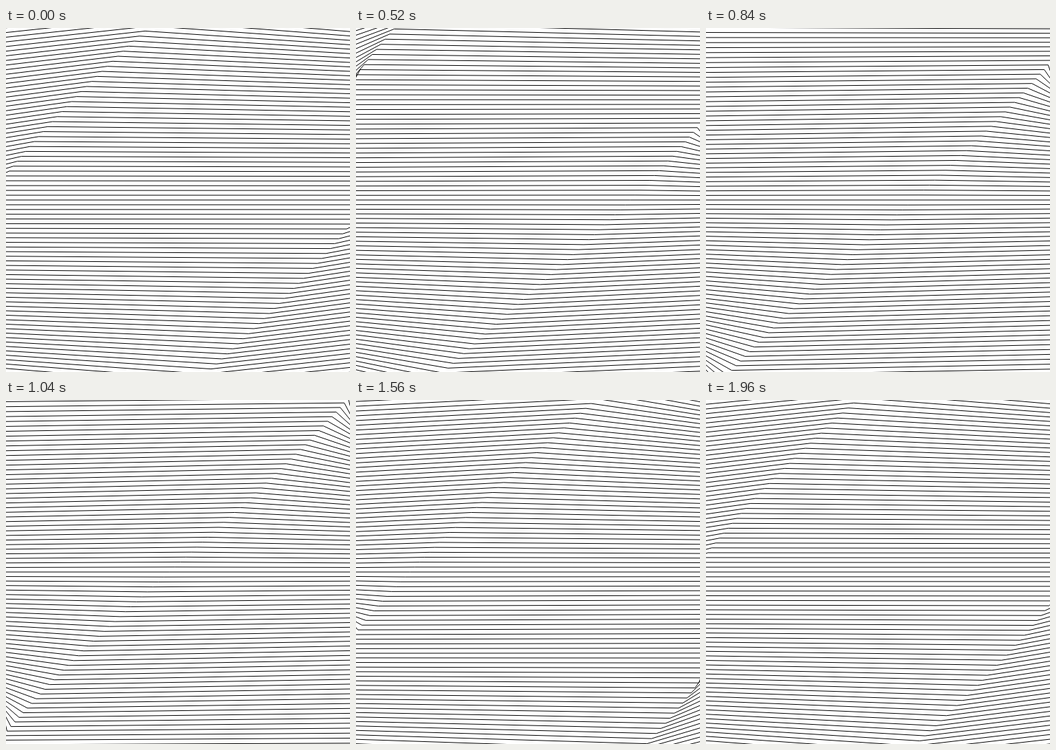
An HTML page with a canvas that plays this animation: 500 by 500 pixels, repeating every 2 s.

```html
<!DOCTYPE html>
<html lang="en">
<head>
<meta charset="utf-8">
<title>Twisted column</title>
<style>
html, body { margin: 0; width: 100%; height: 100%; overflow: hidden; background: #fff; }
canvas { display: block; width: 500px; height: 500px; }
</style>
</head>
<body>
<canvas id="stage" width="500" height="500"></canvas>
<script>
// A twisted square column turning in perspective; each slice is one outline.
const ctx = document.getElementById("stage").getContext("2d");
const LOOP = 2000, STEP = 40;
const CENTER = 250;
const QUARTER = Math.PI / 2;
const CAMERA = 8;        // distance in units of the column radius
const RADIUS = 408;      // on screen, at the nearest depth
const GAP = 7.23;        // slice spacing at the nearest depth
const PER_TURN = 80;     // slices per quarter twist

function corner(angle, height) {
  const scale = (CAMERA - 1) / (CAMERA - Math.cos(angle));
  return {
    x: CENTER + RADIUS * Math.sin(angle) * scale,
    y: CENTER + height * scale
  };
}

function draw(progress) {
  ctx.fillStyle = "#fff";
  ctx.fillRect(0, 0, 500, 500);
  ctx.strokeStyle = "#000";
  ctx.lineWidth = 1;
  ctx.beginPath();
  for (let i = -55; i <= 55; i++) {
    const turn = QUARTER * (0.5 - i / PER_TURN - progress);
    for (let side = 0; side < 4; side++) {
      const a = corner(turn + side * QUARTER, i * GAP);
      const b = corner(turn + (side + 1) * QUARTER, i * GAP);
      if (a.x >= b.x) continue; // faces turned away stay hidden
      ctx.moveTo(a.x, a.y);
      ctx.lineTo(b.x, b.y);
    }
  }
  ctx.stroke();
}

const start = performance.now();
function tick() {
  const time = (performance.now() - start) % LOOP;
  draw(Math.floor(time / STEP) * STEP / LOOP);
  requestAnimationFrame(tick);
}
tick();
</script>
</body>
</html>
```
